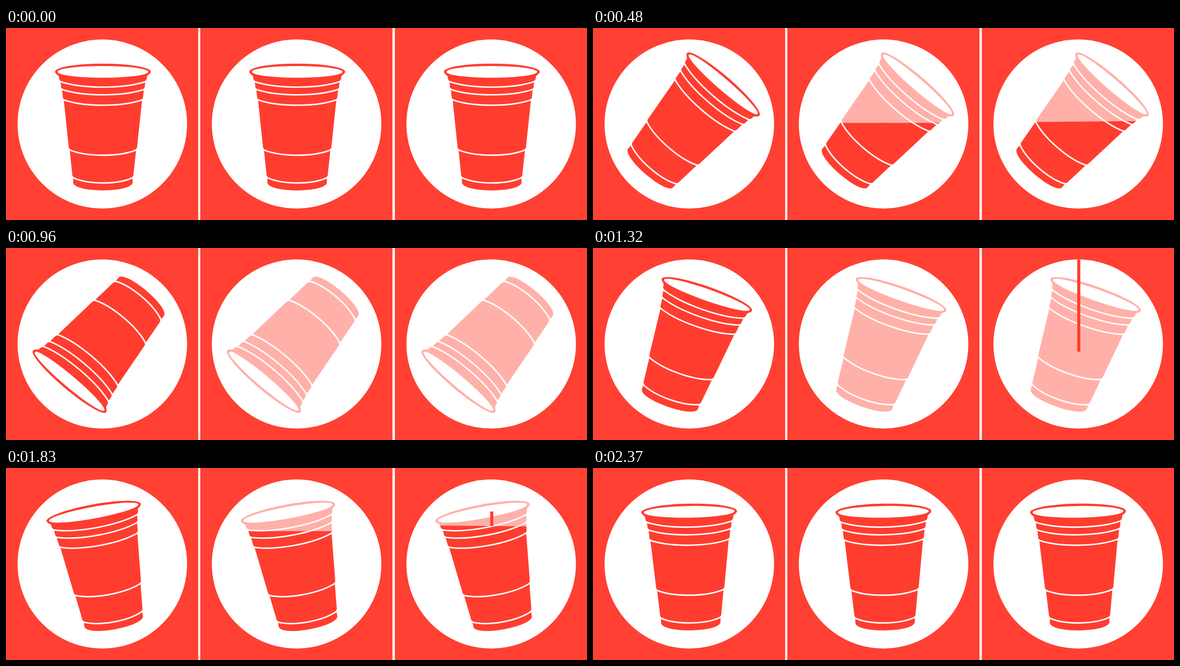
Animation of 1280x424 px, one loop 2.4 s. Source, as an HTML page with a canvas:

```html
<!DOCTYPE html>
<html>
<head>
<meta charset="utf-8">
<style>
html, body { margin: 0; width: 1280px; height: 424px; overflow: hidden; background: #fff; }
canvas { display: block; }
</style>
</head>
<body>
<canvas id="stage" width="1280" height="424"></canvas>
<script>
const ctx = document.getElementById('stage').getContext('2d');
const LOOP = 2400, BACK = '#ff4032', RED = '#ff3d2f', PINK = '#ffb1a9';
const CUP_X = 213.5, PIVOT_X = 213, PIVOT_Y = 209;
const GROOVES = [117, 134, 157, 267.4, 328.7];
const RAD = Math.PI / 180;

// Swing in degrees at even steps through the loop, joined by a smooth spline
const SWING = [0, 8, 40.7, 99.3, 219.7, 360, 378.5, 356, 348.3, 353.5];

function swingAt(t) {
  const n = SWING.length, pos = t / LOOP * n, i = Math.floor(pos), u = pos - i, v = 1 - u;
  const key = k => SWING[(k + n) % n] + 360 * Math.floor(k / n);
  const slope = k => (key(k + 1) - key(k - 1)) / 2;
  return v * v * (1 + 2 * u) * key(i) + u * u * (3 - 2 * u) * key(i + 1)
    + u * v * (v * slope(i) - u * slope(i + 1));
}

// Half width of the tapered wall; each groove steps it in a little
const wall = (y, band) => 105.9 - .106 * y - 1.4 * band;

// One half of the cup, s = -1 left, 1 right
function side(s) {
  let d = `M0 97H${s * 105.5}C${s * 104} 103 ${s * 98} 103 ${s * 97} 108Q${s * 97} 114 ${s * 93.5} 117`;
  for (let i = 0; i < 4; i++) {
    const top = GROOVES[i] + 2, end = GROOVES[i + 1], w = wall(end - 5, i);
    d += `L${s * wall(top, i)} ${top}L${s * w} ${end - 5}Q${s * w} ${end - 1} ${s * (w - 3)} ${end}`;
  }
  return d + `L${s * 65.5} 332V341C${s * 65} 352 ${s * 35} 358.5 0 358.5Z`;
}

function ellipse(y, rx, ry) {
  const path = new Path2D();
  path.ellipse(0, y, rx, ry, 0, 0, 7);
  return path;
}

const body = [new Path2D(side(-1)), new Path2D(side(1)), new Path2D('M-2 100H2V358.5H-2Z'), ellipse(96.5, 105.5, 17.8)];
const opening = ellipse(96.8, 100, 12.9);
const grooves = new Path2D(GROOVES.map((y, i) => {
  const w = wall(y, i - 1) + 3;
  return `M${-w} ${y}C${-w / 2} ${y + 18} ${w / 2} ${y + 18} ${w} ${y}`;
}).join(''));

function cup(color, angle) {
  ctx.save();
  ctx.translate(PIVOT_X, PIVOT_Y);
  ctx.rotate(angle * RAD);
  ctx.translate(CUP_X - PIVOT_X, -PIVOT_Y);
  ctx.fillStyle = color;
  body.forEach(p => ctx.fill(p));
  ctx.fillStyle = ctx.strokeStyle = '#fff';
  ctx.fill(opening);
  ctx.lineWidth = 3.2;
  ctx.stroke(grooves);
  ctx.restore();
}

// The surface sinks ever faster while pouring, then rises evenly
function levelAt(t, lag) {
  return t < 1100 ? 70 + (139 - lag / 4) * (t / 480) ** 2 : 140 - lag + (1830 - t) * .58;
}

function liquidCup(angle, level, tilt) {
  cup(PINK, angle);
  ctx.save();
  ctx.translate(CUP_X, level);
  ctx.rotate(tilt * RAD);
  ctx.beginPath();
  ctx.rect(-300, 0, 600, 900);
  ctx.rotate(-tilt * RAD);
  ctx.translate(-CUP_X, -level);
  ctx.clip();
  cup(RED, angle);
  ctx.restore();
}

function stream(t, level) {
  const top = Math.max(25.5, t - 1735), bottom = Math.min(t - 1092, level);
  if (t < 1100 || bottom <= top) return;
  ctx.fillStyle = RED;
  ctx.fillRect(CUP_X - 3.4, top, 6.8, bottom - top);
}

function panel(x, paint) {
  ctx.save();
  ctx.translate(x, 0);
  ctx.fillStyle = BACK;
  ctx.fillRect(0, 0, 423.4, 424);
  ctx.fillStyle = '#fff';
  ctx.beginPath();
  ctx.arc(212.2, 212, 186.7, 0, 7);
  ctx.fill();
  paint();
  ctx.restore();
}

function draw(t) {
  const angle = swingAt(t);
  ctx.fillStyle = '#fff';
  ctx.fillRect(0, 0, 1280, 424);
  panel(0, () => cup(RED, angle));
  panel(428, () => liquidCup(angle, levelAt(t, 0), 0));
  panel(856.7, () => {
    const level = levelAt(t, 11.3);
    liquidCup(angle, level, -.5 * Math.sin(t / 400));
    stream(t, level);
  });
}

const start = performance.now();
function tick() {
  draw((performance.now() - start) % LOOP);
  requestAnimationFrame(tick);
}
tick();
</script>
</body>
</html>
```
